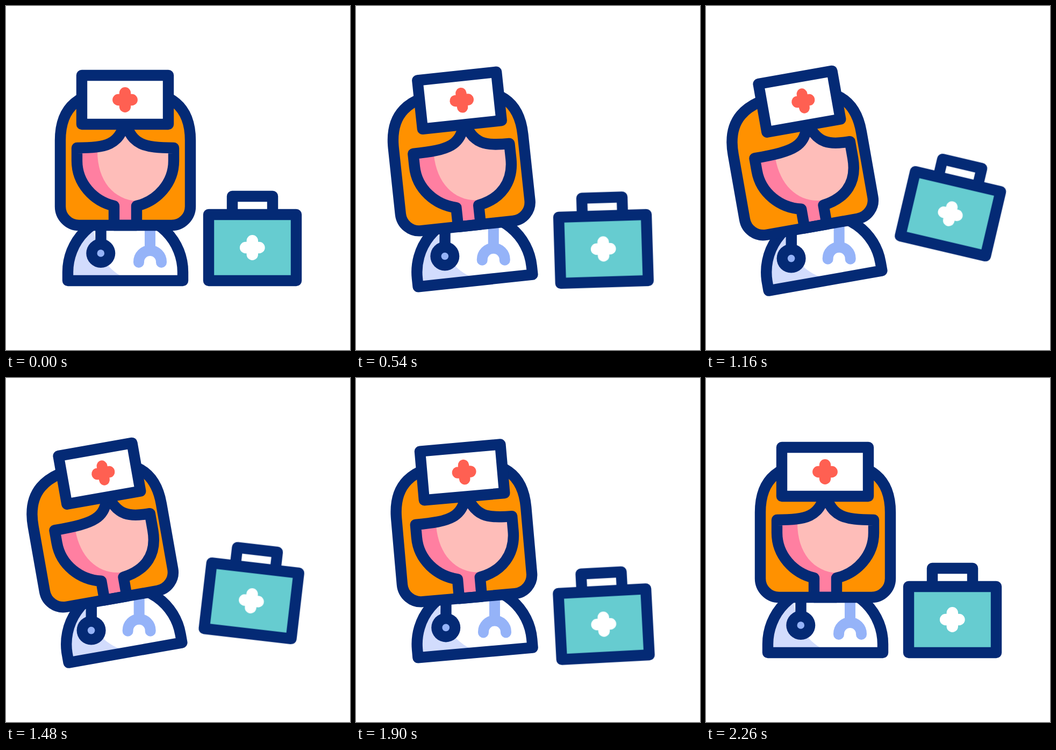
These frames come from a looping animation (640x640 px, 2.4 s). An HTML page without scripts:

```html
<!DOCTYPE html>
<html lang="en">
<head>
<meta charset="utf-8">
<title>Nurse and first aid kit</title>
<style>
  @property --turn { syntax: "<number>"; inherits: true; initial-value: 0; }

  html, body { margin: 0; width: 100%; height: 100%; overflow: hidden; background: #fff; }
  svg { display: block; width: 100%; height: 100%; }

  .line { fill: none; stroke: #042a75; stroke-width: 20.4; stroke-linejoin: round; }
  .cross { fill: none; stroke-width: 21.4; stroke-linecap: round; }
  .fork { fill: none; stroke: #95b3f8; stroke-width: 20; stroke-linecap: round; }

  /* --turn runs from 0 (upright) to 1 (leaning, head turned) */
  .nurse {
    animation: turn 2.4s infinite;
    transform-origin: 222px 511px;
    transform: rotate(calc(var(--turn) * -10deg));
  }
  .hang { transform: rotate(calc(var(--turn) * 10deg)); }
  .disk { transform-origin: 176px 405px; }
  .tube { transform-origin: 268px 398px; }
  .hair { transform: translateX(calc(var(--turn) * -7px)); }
  .hat { x: calc(141px + var(--turn) * 22px); width: calc(161px - var(--turn) * 22px); }
  .badge {
    transform-origin: 221.5px 174.5px;
    transform: translateX(calc(var(--turn) * 18px)) scaleX(calc(1 - var(--turn) * .07));
  }
  .face {
    d: path("M132 264C188 264 209 258 222 216C235 258 256 264 312 264V288C312 330 281 363 243 372V408H201V372C163 363 132 330 132 288Z");
    animation: fringe 2.4s infinite;
  }
  .kit { animation: hop 2.4s infinite; transform-origin: 540px 388px; }

  @keyframes turn {
    0% { --turn: 0; }
    8.333% { --turn: 0; animation-timing-function: cubic-bezier(.33, 0, .67, 1); }
    33.125%, 68.333% { --turn: 1; animation-timing-function: cubic-bezier(.4, 0, .39, 1); }
    94.167%, 100% { --turn: 0; }
  }
  @keyframes fringe {
    8.333% { animation-timing-function: cubic-bezier(.33, 0, .67, 1);
      d: path("M132 264C188 264 209 258 222 216C235 258 256 264 312 264V288C312 330 281 363 243 372V408H201V372C163 363 132 330 132 288Z"); }
    33.125%, 68.333% { animation-timing-function: cubic-bezier(.4, 0, .39, 1);
      d: path("M132 264C210 264 228 258 240 216C252 258 274 264 312 264V295C312 340 288 366 243 372V408H201V372C163 363 132 330 132 288Z"); }
    94.167% {
      d: path("M132 264C188 264 209 258 222 216C235 258 256 264 312 264V288C312 330 281 363 243 372V408H201V372C163 363 132 330 132 288Z"); }
  }
  @keyframes hop {
    0% { transform: translate(0, 0) rotate(0deg); }
    17.5% { transform: translate(0, 0) rotate(0deg); animation-timing-function: cubic-bezier(.33, 0, .67, 1); }
    33% { transform: translate(0, 0) rotate(-7deg); animation-timing-function: cubic-bezier(.33, .3, .5, 1); }
    53.333% { transform: translate(8.7px, -45.5px) rotate(14.6deg); animation-timing-function: cubic-bezier(.4, 0, .67, .33); }
    66.667% { transform: translate(-2px, 10px) rotate(-7deg); animation-timing-function: cubic-bezier(.4, 0, .39, 1); }
    94.167%, 100% { transform: translate(0, 0) rotate(0deg); }
  }
</style>
</head>
<body>
<svg viewBox="0 0 640 640">
  <defs>
    <path id="torso" d="M115 511V495A107 107 0 0 1 329 495V511Z"/>
    <path id="bob" d="M101 250C101 190 132 156 222 156S343 190 343 250V373A35 35 0 0 1 308 408H136A35 35 0 0 1 101 373Z"/>
    <path id="plus" d="M-12.7 0H12.7M0 -12.7V12.7"/>
    <clipPath id="skin"><path class="face"/></clipPath>
    <clipPath id="coat"><use href="#torso"/></clipPath>
  </defs>

  <g class="nurse">
    <use href="#torso" fill="#fff"/>
    <path clip-path="url(#coat)" fill="#d2dcfd" d="M100 380H160C160 445 182 484 213 502V515H100Z"/>
    <use href="#torso" class="line"/>

    <g class="hang disk">
      <path class="line" d="M176.5 405V450"/>
      <circle cx="176.3" cy="460" r="27" fill="#042a75"/>
      <circle cx="176.3" cy="460" r="6.8" fill="#95b3f8"/>
    </g>
    <g class="hang tube">
      <path class="fork" d="M268 410V452M247 477V476A21 21 0 0 1 289 476V477"/>
    </g>

    <use href="#bob" class="hair" fill="#ff9100"/>
    <g clip-path="url(#skin)">
      <path fill="#ff7fa1" d="M120 210H325V410H120Z"/>
      <path fill="#febdb9" d="M170 210V270C170 325 200 361 245 363H325V210Z"/>
    </g>
    <path class="face line"/>
    <g class="hair"><use href="#bob" class="line"/></g>

    <rect class="hat line" y="129" height="91" style="fill:#fff"/>
    <g class="badge"><use href="#plus" class="cross" x="221.5" y="174.5" stroke="#ff6052"/></g>
  </g>

  <g class="kit">
    <path class="line" d="M421 388V354H496V388"/>
    <rect class="line" x="377" y="388" width="163" height="123" style="fill:#66ccd0"/>
    <use href="#plus" class="cross" x="458.3" y="449.5" stroke="#fff"/>
  </g>
</svg>
</body>
</html>
```
